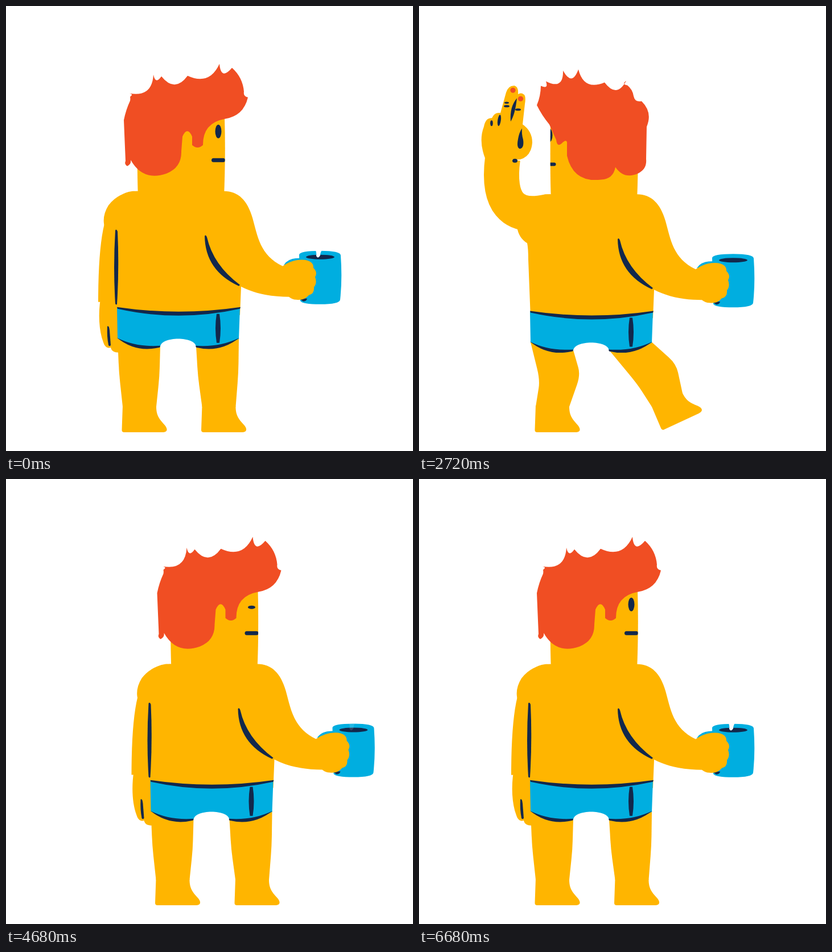
An HTML page that plays this animation: 715x783 px, repeating every 6720 ms.

```html
<!DOCTYPE html>
<html lang="en">
<head>
<meta charset="utf-8">
<title>Coffee in shorts</title>
<style>
html, body { margin: 0; width: 100%; height: 100%; overflow: hidden; background: #fff; }
svg { display: block; width: 100vw; height: 100vh; }
.skin { fill: #ffb500; } .hair { fill: #f04e23; } .ink { fill: #12284c; } .blue { fill: #00aee0; }
</style>
</head>
<body>
<svg viewBox="0 0 715 783">
  <defs>
    <clipPath id="faceClip"><path d="M231 196H384Q386 260 383 335H232Q230 290 231 196Z"/></clipPath>
    <path id="foot" class="skin" d="M-29.5 -2L29.5 -1C29 17 37 24 44 32C50 39 50 45 40 45H-27Q-31 45 -31 41Z"/>
  </defs>
  <path id="legL" class="skin"/><use id="footL" href="#foot"/>
  <path id="legR" class="skin"/><use id="footR" href="#foot"/>
  <g id="body">
    <g id="armLayer">
      <g id="lowHand">
        <path class="skin" d="M166 514C162 540 163 570 171 591C174 601 181 602 184 600C185 606 190 609 198 609V514Z"/>
        <path class="ink" d="M178 563Q181 561 182 570L184 596Q182 599 180 596Q177 580 178 563Z"/>
      </g>
      <path id="arm" fill="none" stroke="#ffb500" stroke-width="62"/>
      <g id="hand">
        <path class="skin" d="M117 270Q104 238 114 212Q117 196 128 197Q133 186 143 188L153 152Q157 139 168 140Q175 142 174 155Q180 151 185 156Q188 160 186 172L182 208Q199 220 199 240Q197 265 177 270Z"/>
        <g class="hair"><circle cx="165" cy="148" r="4.6"/><circle cx="178.5" cy="163" r="4.6"/></g>
        <g class="ink">
          <path d="M172 162Q159 177 161 203Q169 190 172 162ZM181 215Q180 225 183 235Q185 250 177 251Q171 249 174 234Q176 222 181 215Z"/>
          <ellipse cx="154" cy="170" rx="4" ry="1.7"/><ellipse cx="154" cy="176" rx="5" ry="2"/>
          <ellipse cx="174" cy="182" rx="5" ry="2"/><ellipse cx="127.5" cy="206" rx="2.3" ry="5"/>
          <ellipse cx="141" cy="201" rx="2.8" ry="10" transform="rotate(8 141 201)"/>
          <ellipse cx="168.5" cy="272" rx="4.5" ry="3.5"/>
        </g>
      </g>
    </g>
    <g clip-path="url(#faceClip)">
      <path class="skin" d="M220 190H400V340H220Z"/>
      <g id="faceR"><ellipse id="eyeR" class="ink" cx="373"/><rect class="ink" x="361" y="267" width="24" height="7" rx="3.5"/></g>
      <g id="faceL"><ellipse id="eyeL" class="ink" cx="229"/><rect class="ink" x="215" y="268" width="25.5" height="6" rx="3"/></g>
    </g>
    <path id="hair" class="hair"/>
    <g id="torso">
      <path class="blue" d="M488 455Q496 442 517 443L530 455ZM515 437Q516 430 552 430Q588 430 588 438Q591 480 587 516Q586 524 552 524Q520 524 517 518Z"/>
      <ellipse class="ink" cx="552" cy="441" rx="25" ry="4"/>
      <path class="ink" d="M515 514H529Q528 519 522 519Z"/>
      <path id="steam" fill="#fff" d="M-5 427Q-2 433 -3 439Q0 445 4 438Q4 433 8 427Z"/>
      <path class="skin" d="M232 325Q198 326 180 350Q170 366 172 382Q175 402 190 411Q192 420 192 440L196 543H411L413 493C440 507 470 511 497 511Q503 516 510 516Q524 518 532 508Q542 506 541 494Q547 487 543 476Q548 468 540 460Q541 449 525 446Q505 444 486 457C446 438 442 404 433 372C424 341 408 325 383 325Z"/>
      <path class="ink" d="M349 404Q351 401 353 406Q364 455 411 490L409 492Q350 465 349 404Z"/>
    </g>
    <path id="crease" class="ink" d="M381 299Q383 295 384 304Q386 319 393 320Q402 323 407 331Q392 330 384 325Q379 320 381 299Z"/>
    <path id="armLine" class="ink" d="M192 394Q194 391 196 396Q199 460 195 524Q193 526 192 523Q188 460 192 394Z"/>
    <path class="blue" d="M195 530Q303 548 411 530L409 585Q372 604 334 599C333 580 272 580 271 599Q232 604 196 584Z"/>
    <path class="ink" d="M195 529Q303 545 412 529L411 532Q303 556 196 532ZM370 541H375Q379 566 375 592H370Q366 566 370 541ZM195 583Q228 600 271 597L270 600Q228 610 195 583ZM410 583Q376 600 333 597L334 600Q376 610 410 583Z"/>
  </g>
</svg>
<script>
const LOOP = 6720, STEP = 40, WALK = 58.5;
const el = {};
document.querySelectorAll('[id]').forEach(node => el[node.id] = node);

const clamp = u => Math.min(1, Math.max(0, u));
const mix = (a, b, u) => a.map((v, i) => v + (b[i] - v) * u);
const move = (node, x, y, rest = '') => node.setAttribute('transform', `translate(${x} ${y}) ${rest}`);
const show = (node, on) => node.setAttribute('visibility', on ? 'visible' : 'hidden');

let now = 0;
const linear = (from, to) => clamp((now - from) / (to - from));
const ramp = (from, to) => { const u = linear(from, to); return u * u * (3 - 2 * u); };
const hump = (from, to) => Math.sin(Math.PI * linear(from, to));

// Key points of the hair, clockwise from the nape; "=" repeats a point hidden in that view.
function points(text) {
  const list = [];
  for (const word of text.split(' ')) list.push(word === '=' ? list[list.length - 1] : word.split(',').map(Number));
  return list;
}
const HAIR = {
  left: points('345,276 320,298 260,256 260,236 253,232 241,228 229,201 207,167 214,133 223,125 253,106 280,104 326,127 364,124 366,132 377,151 391,160 400,205 = = = = 399,262 385,287'),
  back: points('299,280 283,301 222,268 = = = 218,200 228,158 229,131 245,119 285,103 318,106 370,127 372,135 372,144 380,152 385,160 396,205 = = = = 394,250 385,288'),
  right: points('219,270 213,281 210,272 = = = 207,200 218,166 218,159 217,153 259,120 273,123 319,122 375,101 397,108 418,150 425,160 384,198 346,244 327,244 327,229 310,229 308,255 282,294')
};
const FIRST_TUFT = 8, LAST_TUFT = 13;
const BULGE = { 0: .4, 1: .45, 3: -1.1, 4: 1.1, 6: .06, 7: -.1, 14: .2, 15: -.5, 16: .34, 17: -.42, 18: .45, 20: -1.1, 22: .35, 23: .42 };

// Each edge is one curve: tufts sag by a set depth, the rest bulge by their length.
function hairPath(turn) {
  const side = turn > 0 ? HAIR.right : HAIR.left;
  const pts = HAIR.back.map((p, i) => mix(p, side[i], Math.abs(turn)));
  return 'M' + pts[0] + pts.map(([x, y], i) => {
    const [nx, ny] = pts[(i + 1) % pts.length];
    const dx = nx - x, dy = ny - y, len = Math.hypot(dx, dy);
    const tuft = i >= FIRST_TUFT && i <= LAST_TUFT;
    const k = tuft ? -Math.min(1.2, 30 / (len || 1)) : BULGE[i] || 0;
    return `Q${(x + nx) / 2 + dy * k} ${(y + ny) / 2 - dx * k} ${nx} ${ny}`;
  }).join('') + 'Z';
}

function drawHead() {
  const turn = 1 - ramp(760, 1260) - ramp(1400, 1840) + 2 * ramp(2760, 3320)
    - 2 * ramp(4760, 5240) + 2 * ramp(5440, 6500);
  el.hair.setAttribute('d', hairPath(turn));
  move(el.faceR, (1 - turn) * 35, 0);
  move(el.faceL, -(1 + turn) * 6, 0);
  const blink = hump(180, 420) + hump(4560, 4800);
  for (const eye of [el.eyeR, el.eyeL]) {
    eye.setAttribute('rx', 5.5 + blink);
    eye.setAttribute('ry', 12 - 9 * blink);
    eye.setAttribute('cy', 220 + 5 * blink);
  }
}

// Elbow control point, then wrist
const ARM = { down: [193, 360, 193, 520], up: [132, 376, 147, 262], across: [350, 356, 446, 243] };

function drawArm(breath) {
  const raise = ramp(1450, 1900), cross = ramp(2760, 3350), drop = ramp(3720, 4060);
  const reach = mix(mix(ARM.down, ARM.up, raise), ARM.across, cross);
  const [ex, ey, wx, low] = mix(reach, ARM.down, drop);
  const wy = low - 100 * hump(3720, 4060);
  const hanging = raise < 0.4 || drop > 0.7;
  el.arm.setAttribute('d', `M231 356H225Q${ex} ${ey} ${wx} ${wy}`);
  move(el.armLayer, 0, -breath);
  move(el.hand, wx, wy, `rotate(${23 * cross * (1 - drop)}) translate(-147 -268)`);
  move(el.lowHand, wx - ARM.down[2], wy - ARM.down[3] + breath * cross);
  show(el.hand, !hanging);
  show(el.lowHand, hanging);
  show(el.armLine, raise < 0.15 || drop > 0.9);
  show(el.crease, cross > 0.97 && drop < 0.1);
}

function drawLeg(leg, foot, hips, ankle, turn, bend) {
  const a = turn * Math.PI / 180;
  const edge = side => {
    const hip = hips[side < 0 ? 0 : 1];
    const end = [ankle[0] + side * 29.5 * Math.cos(a), ankle[1] + side * 29.5 * Math.sin(a)];
    const mid = mix(hip, end, 0.5);
    const knee = [mid[0] + side * 2 + 14 * bend, mid[1] + (2 - side * 8) * bend];
    return [hip, mix(hip, knee, 0.7), knee, mix(knee, end, 0.3), end];
  };
  const A = edge(-1), B = edge(1);
  leg.setAttribute('d', `M${A[0]}L${A[1]}Q${A[2]} ${A[3]}L${A[4]}L${B[4]}L${B[3]}Q${B[2]} ${B[1]}L${B[0]}Z`);
  move(foot, ankle[0], ankle[1], `rotate(${turn})`);
}

function drawLegs(x, y) {
  const stride = hump(2440, 3000), follow = hump(2900, 3250);
  const left = [234.5 + WALK * (ramp(2900, 3250) - ramp(4850, 5720)), 705 - 14 * follow];
  const right = [374 + WALK * (ramp(2400, 2720) - ramp(5460, 6070)) + 3.5 * stride, 705 - 12 * stride + 3 * hump(5460, 6070)];
  const hips = (inner, outer) => [[inner[0] + x, inner[1] + y], [outer[0] + x, outer[1] + y]];
  drawLeg(el.legL, el.footL, hips([196, 584], [271, 598]), left, 10 * follow + 14 * hump(5000, 6080), stride);
  drawLeg(el.legR, el.footR, hips([334, 598], [409, 584]), right, -25 * stride - 8 * hump(5460, 6070), stride);
}

function draw(t) {
  now = t;
  const x = WALK * (ramp(2740, 3320) - linear(4760, 6070));
  const y = 0.7 - 5 * hump(2100, 2500) + 6.7 * hump(2440, 3000) + 2.3 * hump(5000, 6080);
  const breath = 1.5 * (1 - Math.cos(6 * Math.PI * t / LOOP));
  move(el.body, x, y);
  move(el.torso, 0, -breath);
  drawLegs(x, y);
  drawHead();
  drawArm(breath);
  move(el.steam, 548 - 12 * hump(5100, 6400), 0);
  el.steam.setAttribute('opacity', 1 - ramp(400, 680) + ramp(4200, 6300));
}

const start = performance.now();
function tick() {
  const t = (performance.now() - start) % LOOP;
  draw(Math.floor(t / STEP) * STEP);
  requestAnimationFrame(tick);
}
tick();
</script>
</body>
</html>
```
